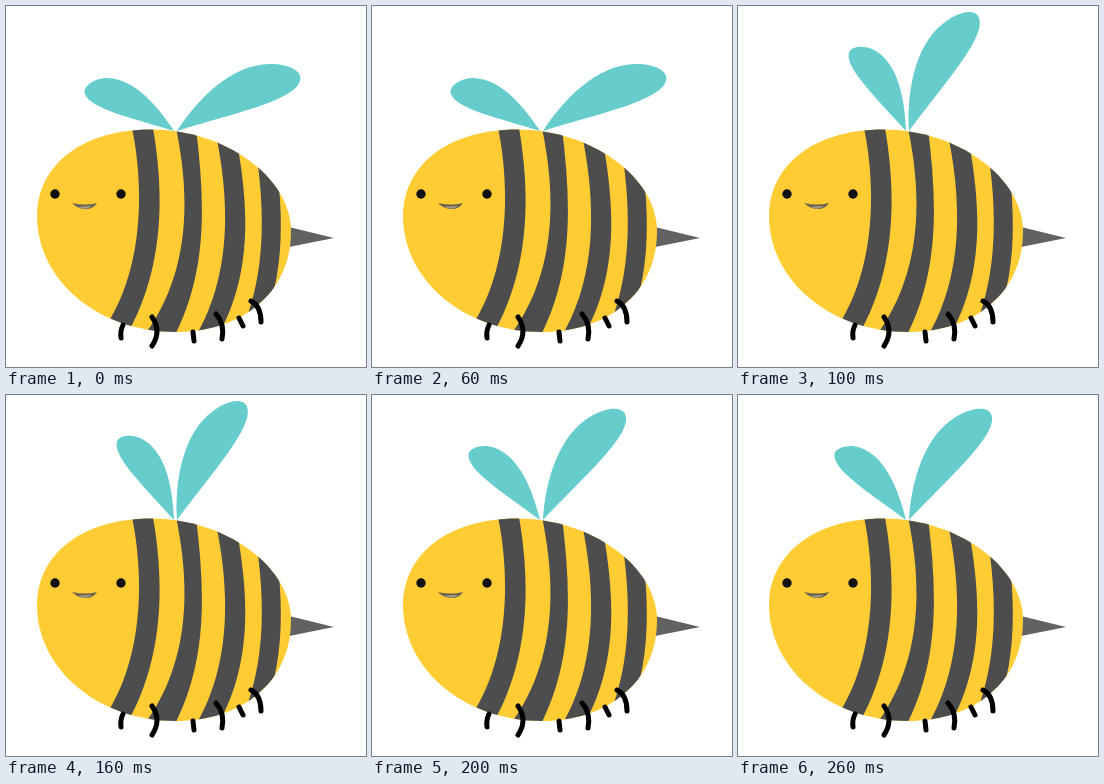
These frames come from a looping animation (360 by 361 pixels, 0.3 s). An HTML page:

```html
<!DOCTYPE html>
<html lang="en">
<head>
<meta charset="utf-8">
<title>Bee</title>
<style>
html, body { margin: 0; height: 100%; overflow: hidden; background: #fff; }
svg { display: block; width: 100%; height: 100%; }
</style>
</head>
<body>
<svg viewBox="0 0 360 361">
  <defs>
    <path id="body" d="M31 210C31 160 75 123.5 145 123.5C220 123.5 285 172 285 225C285 288 235 326 170 326C92 326 31 274 31 210Z"/>
    <clipPath id="inside"><use href="#body"/></clipPath>
  </defs>
  <g fill="#66cdcc">
    <path id="left" d="M168 125C155 105 130 72 101 72C88 72 76 81 79 88C84 103 130 113 168 125Z"/>
    <path id="right" d="M171 125C190 95 225 58 264 58C285 58 297 66 294 75C288 95 225 108 171 125Z"/>
  </g>
  <path d="M283 221L328 232L283 241Z" fill="#626262"/>
  <use href="#body" fill="#fc3"/>
  <g fill="#4d4d4d" clip-path="url(#inside)">
    <path d="M126 122C137 175 139 255 103 315L124 323C160 255 157 180 147 122Z"/>
    <path d="M170 122C182 180 188 260 140 327H170C203 260 198 190 190 122Z"/>
    <path d="M211 134C222 190 227 265 191 328L215 324C246 265 242 200 232 142Z"/>
    <path d="M252 160C257 200 260 255 242 308L268 284C276 250 276 215 273 180Z"/>
  </g>
  <g fill="#111">
    <circle cx="49" cy="188" r="4.7"/>
    <circle cx="115" cy="188" r="4.7"/>
  </g>
  <path d="M66 197Q79 200 91 197Q87 203 80 203Q72 203 66 197Z" fill="#68614f"/>
  <path d="M72 201Q79 200 86 200Q80 205 72 201Z" fill="#a39b85"/>
  <g fill="none" stroke="#000" stroke-width="5" stroke-linecap="round">
    <path d="M117 319Q114 325 115 332"/>
    <path d="M146 311Q156 325 146 340"/>
    <path d="M187 326L188 335"/>
    <path d="M210 308Q219 318 216 333"/>
    <path d="M233 312L237 320"/>
    <path d="M245 295Q255 300 255 316"/>
  </g>
</svg>
<script>
const left = document.getElementById('left');
const right = document.getElementById('right');
// Upward wing angles in degrees, one pair per 100 ms step
const poses = [[0, 0], [31, 36], [19.5, 29.3]];
const start = performance.now();

function draw(now) {
  const step = Math.floor(Math.max(0, now - start) / 100) % poses.length;
  const [l, r] = poses[step];
  left.setAttribute('transform', `rotate(${l} 168 125)`);
  right.setAttribute('transform', `rotate(${-r} 171 125)`);
  requestAnimationFrame(draw);
}
draw(start);
</script>
</body>
</html>
```
